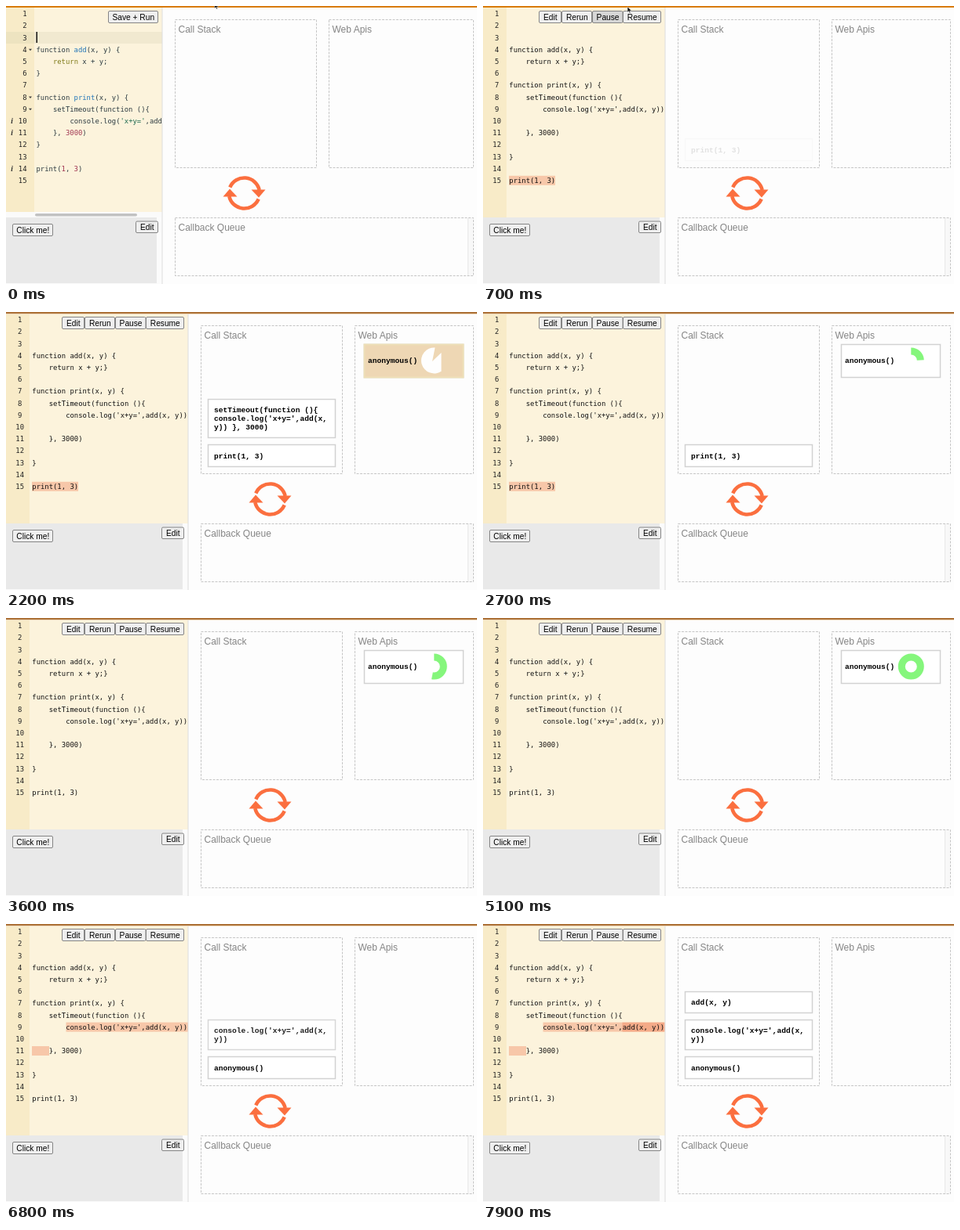
An HTML page that plays this animation: 600x355 px, repeating every 8000 ms.

```html
<!DOCTYPE html>
<html lang="en">
<head>
<meta charset="utf-8">
<title>Call stack and callback queue</title>
<style>
html, body { margin: 0; width: 100%; height: 100%; overflow: hidden; background: #fdfdfd; }
svg { display: block; }
text { font: 10.2px "Liberation Sans", Arial, sans-serif; }
.title { font-size: 12px; fill: #858585; }
.code { font: 8.9px "DejaVu Sans Mono", monospace; fill: #111; }
.edit { fill: #2c3a40; }
.num { fill: #222; }
.fn { fill: #1f74b8; }
.kw { fill: #7f7a18; }
.str { fill: #1f6a50; }
.lit { fill: #a03450; }
.card text { font: bold 9.6px "Liberation Mono", "Courier New", monospace; }
.dash { fill: none; stroke: #c6c6c6; stroke-dasharray: 3 1.5; }
.mark { fill: rgba(238, 116, 72, .34); }
</style>
</head>
<body>
<svg id="stage" width="600" height="355" viewBox="0 0 600 355"></svg>
<script>
const LOOP = 8000, CHAR = 5.36, LINE = 15.2;
const stage = document.getElementById('stage');
const $ = id => document.getElementById(id);

const rect = (x1, y1, x2, y2, attrs) =>
  `<rect x="${x1}" y="${y1}" width="${x2 - x1}" height="${y2 - y1}" ${attrs}/>`;
const text = (x, y, content, attrs = '') => `<text x="${x}" y="${y}" ${attrs}>${content}</text>`;
const lineY = n => 13.2 + (n - 1) * LINE;
const button = (x1, y1, x2, y2, label, id = '') =>
  rect(x1 + .5, y1 + .5, x2 - .5, y2 - .5, `rx="1.5" fill="#efefef" stroke="#858585" id="${id}"`) +
  text((x1 + x2) / 2 + .3, (y1 + y2) / 2 + 3.6, label, 'text-anchor="middle"');
const codeLines = (lines, x, cls) => Object.entries(lines).map(([n, s]) => {
  const indent = s.search(/\S/);
  return text(x + indent * CHAR, lineY(+n), s.trim(), `class="code ${cls}"`);
}).join('');
const span = (cls, s) => `<tspan class="${cls}">${s}</tspan>`;
const mark = (n, x1, x2) => rect(x1, lineY(n) - 9.2, x2, lineY(n) + 2.8, 'class="mark"');
const marks = (id, ...parts) => `<g id="${id}">${parts.map(p => mark(...p)).join('')}</g>`;

function card(id, x1, y1, x2, y2, lines, textX, textY, extra = '') {
  return `<g id="${id}" class="card">` +
    rect(x1 + .5, y1 + .5, x2 - .5, y2 - .5, 'fill="#fff" stroke="#d2d2d2" stroke-width="1.5"') + extra +
    lines.map((s, i) => text(textX, textY + i * 11, s)).join('') + '</g>';
}

// Left column with the editor; edge is where the right column starts.
function editor(edge, gutter, numbers, body) {
  return rect(0, 2, edge, 270, 'fill="#fcf3dc"') + rect(0, 2, gutter, 270, 'fill="#f8ebc8"') +
    numbers + body +
    rect(edge, 0, 600, 355, 'fill="#fdfdfd"') +
    rect(0, 270, edge, 355, 'fill="#fbfbfb"') + rect(0, 270, edge - 7, 354, 'fill="#e9e9e9"') +
    rect(edge - .5, 2, edge + .5, 355, 'fill="#dedede"') +
    button(8, 278, 60, 294, 'Click me!');
}

function panels(left, middle, right) {
  return rect(left + .5, 17.5, middle + .5, 206.5, 'class="dash"') +
    rect(right + .5, 17.5, 595.5, 206.5, 'class="dash"') +
    rect(588, 271, 595, 345, 'fill="#f8f8f8"') + rect(588, 271, 589, 345, 'fill="#e8e8e8"') +
    rect(left + .5, 270.5, 595.5, 344.5, 'class="dash"') +
    text(left + 4.5, 34, 'Call Stack', 'class="title"') +
    text(right + 4.5, 34, 'Web Apis', 'class="title"') +
    text(left + 4.5, 287, 'Callback Queue', 'class="title"');
}

function lineNumbers(x, anchor) {
  return Array.from({ length: 15 }, (_, i) =>
    text(x, lineY(i + 1), i + 1, `class="code num" text-anchor="${anchor}"`)).join('');
}

const draft = {
  4: `function ${span('fn', 'add')}(x, y) {`,
  5: `    ${span('kw', 'return')} x + y;`,
  6: '}',
  8: `function ${span('fn', 'print')}(x, y) {`,
  9: '    setTimeout(function (){',
  10: `        console.log(${span('str', "'x+y='")},add(x, y))`,
  11: `    }, ${span('lit', '3000')})`,
  12: '}',
  14: `print(${span('lit', '1')}, ${span('lit', '3')})`
};
const running = {
  4: 'function add(x, y) {', 5: '    return x + y;}',
  7: 'function print(x, y) {', 8: '    setTimeout(function (){',
  9: "        console.log('x+y=',add(x, y))", 11: '    }, 3000)', 13: '}', 15: 'print(1, 3)'
};

const folds = [4, 8, 9].map(n =>
  `<path d="M29 ${lineY(n) - 4}h4l-2 2.4z" fill="#444"/>`).join('');
const hints = [10, 11, 14].map(n =>
  text(6.3, lineY(n), 'i', 'style="font:italic bold 9.5px \'Liberation Serif\',serif" fill="#333"')).join('');
const arrow = '<path d="M-18.2-7.5A19.7 19.7 0 0 1 19.2-4" fill="none" stroke="#fb6f3f" stroke-width="4.6"/>' +
  '<path d="M9-4.5H27L18.5 5.5z" fill="#fb6f3f"/>';

stage.innerHTML =
  `<g id="editing">${editor(199, 36, rect(0, 33, 36, 48, 'fill="#ede3c0"') +
      rect(36, 33, 199, 48, 'fill="#f1e9d0"') + lineNumbers(26.5, 'end') + folds + hints,
      codeLines(draft, 38.5, 'edit') + rect(38.5, 33, 40, 47, 'fill="#111"') +
      rect(0, 263, 199, 270, 'fill="#fafafa"') + rect(37, 265, 167, 268.5, 'rx="1.7" fill="#c2c2c2"'))}
    ${button(130, 6, 194, 22, 'Save + Run')}${button(165, 274.5, 194, 290, 'Edit')}
    ${panels(215, 395, 411)}</g>
  <g id="running">${editor(232, 30, lineNumbers(17.7, 'middle'),
      marks('printMark', [15, 33, 92]) +
      marks('timeoutMark', [8, 55, 178], [9, 33, 232], [11, 33, 98]) +
      marks('logMark', [9, 76.5, 232], [11, 33, 55]) +
      marks('addMark', [9, 177.5, 231]) +
      codeLines(running, 33.3, ''))}
    ${button(71, 6, 100, 22, 'Edit')}${button(100, 6, 139, 22, 'Rerun')}
    ${button(139, 6, 178.5, 22, 'Pause', 'pause')}${button(178, 6, 227, 22, 'Resume')}
    ${button(198, 274.5, 227, 290, 'Edit')}${panels(248, 428, 444)}
    ${card('printCard', 257, 169, 420, 198, ['print(1, 3)'], 265, 186.6)}
    ${card('timeoutCard', 257, 111, 420, 161,
      ['setTimeout(function (){', "console.log('x+y=',add(x,", 'y)) }, 3000)'], 265, 127.6)}
    ${card('apiCard', 456, 41, 583, 84, ['anonymous()'], 461, 65,
      `<g id="flash">${rect(456.5, 41.5, 582.5, 83.5, 'fill="#eed7b4" stroke="#eee0b8" stroke-width="2"')}
       <path d="M543 63L554.5 52V75.8A16.5 16.5 0 1 1 546.5 45.5z" fill="#fff"/></g>
       <circle id="ring" cx="545.3" cy="62" r="12" fill="none" stroke="#85f67c" stroke-width="9"
        pathLength="1" transform="rotate(-90 545.3 62)"/>`)}
    ${card('queueCard', 257, 275, 406, 325, ['anonymous()'], 265, 303)}
    ${card('callbackCard', 257, 169, 420, 198, ['anonymous()'], 265, 186.6)}
    ${card('logCard', 257, 122, 420, 161, ["console.log('x+y=',add(x,", 'y))'], 265, 138.8)}
    ${card('addCard', 257, 86, 420, 114, ['add(x, y)'], 265, 102.8)}
  </g>
  <g id="loop">${arrow}<g transform="rotate(180)">${arrow}</g></g>
  <rect id="bar" width="600" height="2"/>
  <rect id="barShade" y="2" width="600" height="1" fill="#ecd6b8"/>
  <path id="pointer" d="M0 0V7L1.6 5.5 2.7 8 3.8 7.5 2.8 5.1H5z" fill="#111" stroke="#fff" stroke-width=".4"/>`;

const RUN = 400, API = 1950, FADE = 260;
// [card, enters, leaves]
const cards = [
  ['printCard', 650, 2950], ['timeoutCard', 1400, 2230], ['apiCard', API, 5150],
  ['queueCard', 5150, 5850], ['callbackCard', 5840, LOOP], ['logCard', 6600, LOOP], ['addCard', 7300, LOOP]
];
// [highlight, on, off]
const highlights = [
  ['printMark', 650, 2900], ['timeoutMark', 1400, 2150], ['logMark', 6600, LOOP], ['addMark', 7300, LOOP]
];
const pointerPath = [[0, 266, -4], [250, 168, 12], [450, 168, 12], [700, 184, 1], [950, 200, -10]];

const clamp = v => Math.min(1, Math.max(0, v));
const smooth = v => { v = clamp(v); return v * v * (3 - 2 * v); };
const show = (id, on) => $(id).setAttribute('visibility', on ? 'inherit' : 'hidden');

function pointerAt(t) {
  const i = Math.max(1, pointerPath.findIndex(p => p[0] >= t));
  const [t0, x0, y0] = pointerPath[i - 1], [t1, x1, y1] = pointerPath[i];
  const k = clamp((t - t0) / (t1 - t0));
  return [x0 + (x1 - x0) * k, y0 + (y1 - y0) * k];
}

function draw(t) {
  const live = t >= RUN, away = t >= 1000;
  show('editing', !live);
  show('running', live);
  for (const [id, enter, leave] of cards)
    $(id).setAttribute('opacity', smooth((t - enter) / FADE) * (1 - smooth((t - leave) / FADE)));
  for (const [id, on, off] of highlights)
    $(id).setAttribute('opacity', t >= on && t < off ? 1 : 0);

  $('flash').setAttribute('opacity', 1 - smooth((t - 2200) / 400));
  $('ring').setAttribute('stroke-dasharray', `${clamp((t - API) / 3100)} 2`);
  $('ring').setAttribute('opacity', smooth((t - 2200) / 300));

  const spin = 180 * smooth((t - 5850) / 600);
  $('loop').setAttribute('transform', `translate(${live ? 336.5 : 303.5} 239) rotate(${spin})`);

  $('pause').setAttribute('fill', t < 900 ? '#d6d6d6' : '#efefef');
  $('bar').setAttribute('fill', away ? '#ad7238' : '#d97d08');
  show('barShade', away);
  show('pointer', !away);
  $('pointer').setAttribute('transform', `translate(${pointerAt(Math.min(t, 950))})`);
}

function tick() {
  draw(performance.now() % LOOP);
  requestAnimationFrame(tick);
}
tick();
</script>
</body>
</html>
```
